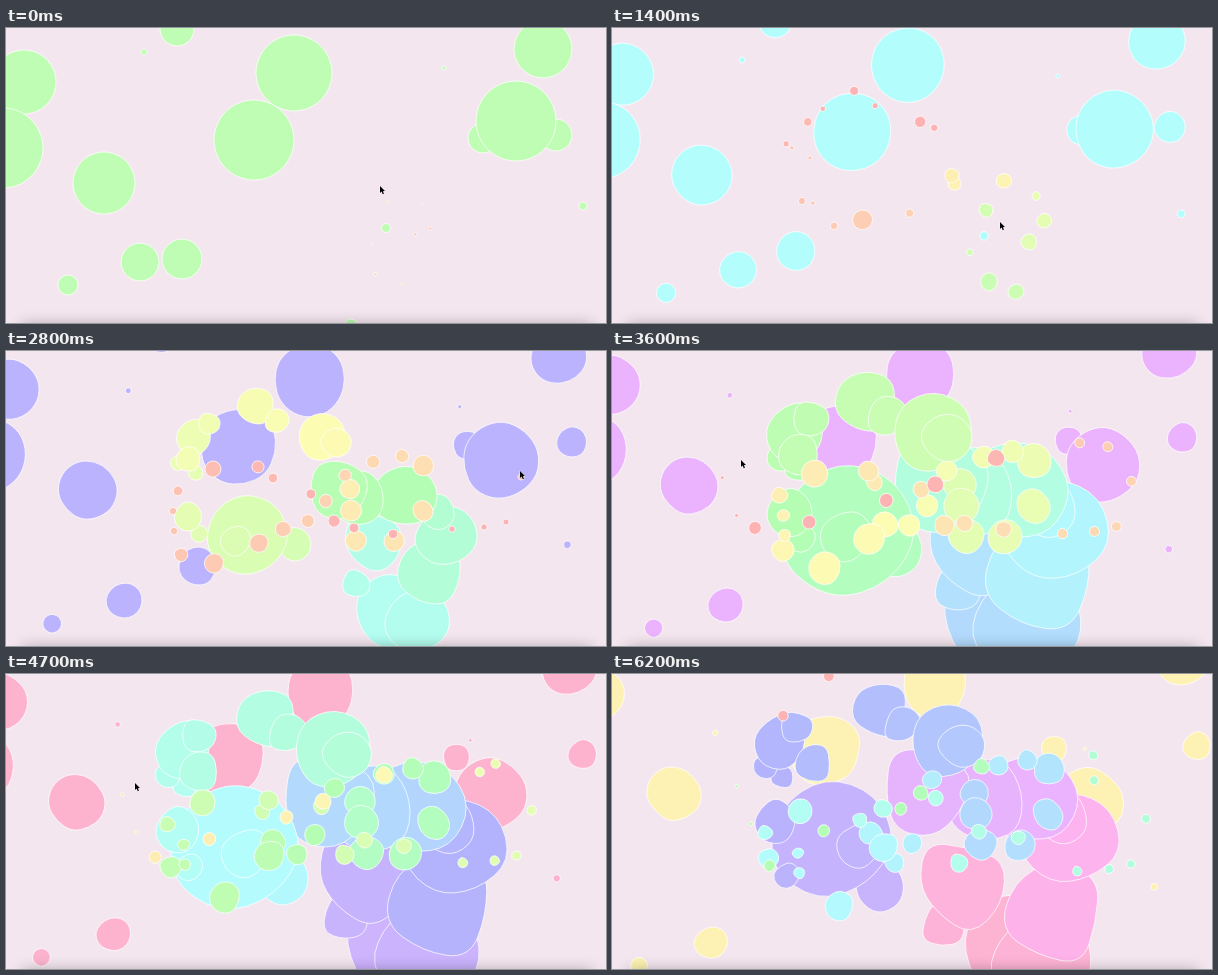
Recreate the animation shown at these times as an HTML page with a canvas. Size 600 px wide and 295 px high, loop 6300 ms.

```html
<!DOCTYPE html>
<html lang="en">
<head>
<meta charset="utf-8">
<title>Drifting blobs</title>
<style>
html, body { margin: 0; width: 100%; height: 100%; overflow: hidden; background: #f4e6ef; }
canvas { display: block; }
</style>
</head>
<body>
<canvas width="600" height="295"></canvas>
<script>
const ctx = document.querySelector('canvas').getContext('2d');
const LOOP = 6.3, STEP = 0.1, DRIFT = 5.6, HUE_SPEED = 48.4, HUE_DELAY = 14;
const PIN = 2.8, PEAK = 3.6, SPACING = 0.05;
const headings = { nw: [-1, -1], ne: [1, -1], sw: [-1, 1], se: [1, 1] };
const blobs = [];
const noise = n => { const v = Math.sin(n * 127.1 + 3.7) * 43758.5; return v - Math.floor(v); };
const mix = (a, b, k) => a + (b - a) * k;

// The pointer rests at these places [time, x, y] and draws strokes in between.
const path = [[0, 374, 158], [1.4, 388, 194], [PIN, 514, 120],
  [PEAK, 129, 109], [5.8, 129, 109], [6.2, 240, -20]];

function addBlob(blob) {
  blobs.push({ ...blob, seed: blobs.length * 20 + 1 });
}

// Discs that are on stage from the start: x, y, radius.
function discs(heading, places) {
  for (const [x, y, r] of places)
    addBlob({ x, y, r, heading, born: -2.3, pin: 0, corners: 10, disc: true });
}

// Blobs dropped one after another along the pointer's way: x, y and maybe a radius.
function stroke(start, heading, size, places) {
  places.forEach(([x, y, r = size], i) => {
    const born = start + i * SPACING;
    path.push([born, x, y]);
    addBlob({ x, y, r, heading, born, pin: Math.max(PIN, born), corners: 7 });
  });
}

discs('nw', [[18, 54, 32], [-3, 120, 40], [98, 155, 31], [171, 1, 17], [248, 112, 40], [477, 110, 15]]);
discs('ne', [[288, 45, 38], [176, 231, 20], [537, 21, 29], [550, 107, 16]]);
discs('sw', [[134, 234, 19], [62, 257, 10], [510, 93, 40], [380, 200, 4.5], [577, 178, 4],
  [138, 24, 3], [345, 297, 6]]);
discs('se', [[438, 40, 2]]);

// Stem
stroke(-1, 'se', 50, [[385, 262, 58], [412, 272]]);
stroke(-0.9, 'sw', 46, [[350, 232, 22], [366, 190]]);
stroke(-0.6, 'se', 52, [[425, 222]]);
stroke(-0.55, 'ne', 48, [[440, 185], [432, 160, 28]]);

// First round
stroke(0.02, 'ne', 50, [[400, 145], [350, 148, 44]]);
stroke(0.1, 'nw', 48, [[332, 140]]);
stroke(0.6, 'sw', 27, [[290, 193]]);
stroke(0.65, 'nw', 66, [[243, 184]]);
stroke(0.7, 'ne', 24, [[230, 190]]);
stroke(0.8, 'sw', 14, [[193, 183]]);
stroke(0.85, 'nw', 12, [[182, 165, 23], [190, 122], [172, 112], [188, 86, 28], [203, 73, 18]]);
stroke(1.1, 'ne', 20, [[182, 108], [250, 55, 30], [271, 70], [316, 86, 37], [330, 92, 24]]);

// Second round
stroke(1.53, 'ne', 17, [[344, 138], [345, 160], [350, 190], [388, 190], [417, 160],
  [417, 115], [396, 105, 11], [367, 111, 11]]);
stroke(1.92, 'nw', 10, [[339, 124]]);
stroke(1.97, 'sw', 11, [[320, 150], [302, 170]]);
stroke(2.05, 'nw', 13, [[277, 178]]);
stroke(2.1, 'ne', 15, [[253, 192]]);
stroke(2.13, 'se', 16, [[208, 212]]);
stroke(2.17, 'nw', 11, [[175, 204]]);
stroke(2.2, 'se', 6, [[168, 180], [167, 160]]);
stroke(2.3, 'sw', 8, [[172, 140], [207, 118, 13], [267, 127]]);
stroke(2.42, 'se', 10, [[252, 116], [328, 170]]);
stroke(2.5, 'ne', 8, [[305, 143], [348, 177], [387, 183]]);
stroke(2.62, 'se', 5, [[446, 178], [478, 176], [500, 171], [515, 126]]);

// Last sweep
stroke(2.85, 'nw', 5, [[500, 100]]);
stroke(2.9, 'se', 5, [[464, 88]]);
stroke(3.25, 'nw', 8.5, [[386, 109], [325, 135]]);
stroke(3.35, 'ne', 7, [[273, 151], [196, 172]]);
stroke(3.45, 'se', 6.5, [[142, 176]]);
stroke(3.5, 'ne', 2, [[124, 165], [110, 127]]);
stroke(6, 'ne', 6, [[170, 43], [216, 3]]);

blobs.sort((a, b) => a.born - b.born);
path.sort((a, b) => a[0] - b[0]);

function pointerAt(t) {
  const i = Math.max(1, path.findIndex(p => p[0] >= t));
  const [t0, x0, y0] = path[i - 1], [t1, x1, y1] = path[i];
  const k = Math.min(1, (t - t0) / (t1 - t0));
  return [mix(x0, x1, k), mix(y0, y1, k)];
}

const growth = t => t < PEAK ? Math.max(0.03, (t / PEAK) ** 2) : 1 - 0.04 * (t - PEAK);

// Closed smooth curve through the middles of a polygon with uneven corners.
function outline(x, y, r, wobble, { corners, seed }) {
  const corner = i => {
    const n = (i + corners) % corners;
    const angle = (n + noise(seed)) / corners * Math.PI * 2;
    const d = r / Math.cos(Math.PI / corners) * (1 + wobble * (noise(seed + n + 1) - 0.5));
    return [x + d * Math.cos(angle), y + d * Math.sin(angle)];
  };
  ctx.beginPath();
  for (let i = 0; i <= corners; i++) {
    const [ax, ay] = corner(i), [bx, by] = corner(i + 1);
    const mx = (ax + bx) / 2, my = (ay + by) / 2;
    if (i) ctx.quadraticCurveTo(ax, ay, mx, my);
    else ctx.moveTo(mx, my);
  }
}

function drawBlob(b, t) {
  const age = t - b.born;
  if (age < 0) return;
  const [dx, dy] = headings[b.heading];
  const way = DRIFT * (t - b.pin);
  const r = b.r * (b.disc ? 1 - 0.022 * t : growth(t));
  const wobble = b.disc ? 0.03 * t : 0.1 + 0.05 * age;
  outline(b.x + dx * way, b.y + dy * way, r, wobble, b);
  const hue = Math.max(0, age * HUE_SPEED - (b.disc ? 0 : HUE_DELAY));
  ctx.fillStyle = `hsl(${hue} 95% 84.7%)`;
  ctx.fill();
  ctx.stroke();
}

function drawPointer(x, y) {
  ctx.beginPath();
  for (const [dx, dy] of [[0, 0], [0, 7], [1.6, 5.6], [2.8, 8.3], [4, 7.8], [2.9, 5.2], [5, 5]])
    ctx.lineTo(x + dx, y + dy);
  ctx.closePath();
  ctx.stroke();
  ctx.fillStyle = '#000';
  ctx.fill();
}

function drawEdge() {
  ctx.save();
  ctx.shadowColor = 'rgba(0,0,0,0.33)';
  ctx.shadowBlur = 15;
  ctx.fillStyle = '#000';
  ctx.fillRect(16, 297, 570, 20);
  ctx.restore();
}

function frame(ms) {
  const t = Math.floor(ms / 1000 % LOOP / STEP + 1e-6) * STEP;
  ctx.fillStyle = '#f4e6ef';
  ctx.fillRect(0, 0, 600, 295);
  ctx.lineWidth = 1;
  ctx.lineJoin = 'round';
  ctx.strokeStyle = 'rgba(255,255,255,0.75)';
  for (const b of blobs) drawBlob(b, t);
  drawEdge();
  drawPointer(...pointerAt(Math.min(t, 6.2)));
}

const start = performance.now();
function tick(now) {
  frame(Math.max(0, now - start));
  requestAnimationFrame(tick);
}
tick(start);
</script>
</body>
</html>
```
